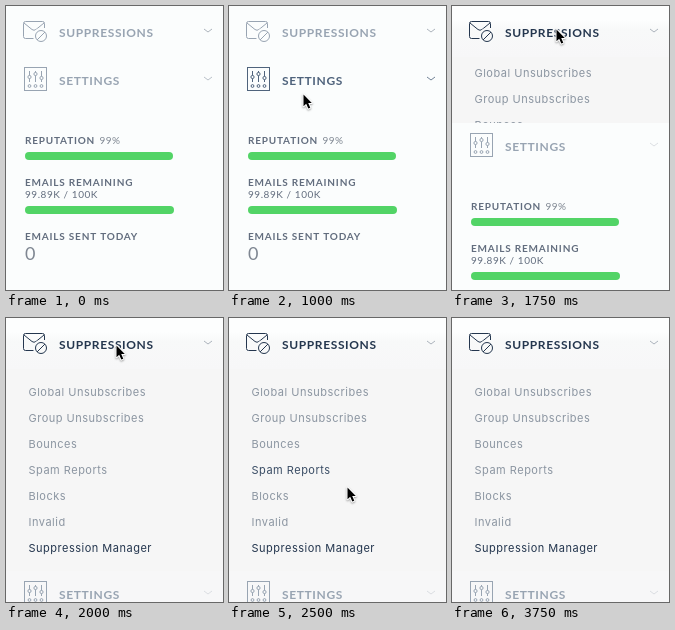
Write an HTML page with a canvas that moves like this. It is 217x284 px and loops after 4250 ms.

```html
<!DOCTYPE html>
<html lang="en">
<head>
<meta charset="utf-8">
<title>Sidebar menu</title>
<style>
html, body { margin: 0; width: 100%; height: 100%; overflow: hidden; background: #fbfdfd; }
canvas { display: block; width: 217px; height: 284px; }
</style>
</head>
<body>
<canvas id="stage"></canvas>
<script>
const W = 217, H = 284, LOOP = 4250;
const canvas = document.getElementById('stage');
const ctx = canvas.getContext('2d');
const scale = window.devicePixelRatio || 1;
canvas.width = W * scale;
canvas.height = H * scale;

const CAPS = 'Lato, "Open Sans", sans-serif';
const BODY = 'Inter, "Open Sans", sans-serif';
const GREY = '#98a4b2', HOVER = '#4f637c', NAVY = '#24364e', LABEL = '#626d7e', SOFT = '#7f8792';
const ITEM = '#8b95a1', ITEM_HOT = '#3a4d65', GREEN = '#52d466';
const ITEMS = ['Global Unsubscribes', 'Group Unsubscribes', 'Bounces', 'Spam Reports',
  'Blocks', 'Invalid', 'Suppression Manager'];

// Each step holds until the next: open = submenu height, hot = hovered item
const STEPS = [
  { at: 0 },
  { at: 750, cursor: [73, 119] },
  { at: 1000, cursor: [73, 87], settings: HOVER },
  { at: 1250, cursor: [98, 38], head: HOVER },
  { at: 1500, cursor: [103, 22], head: HOVER },
  { at: 1750, cursor: [103, 22], head: NAVY, open: 66 },
  { at: 2000, cursor: [109, 26], head: NAVY, open: 202 },
  { at: 2250, cursor: [117, 95], head: NAVY, open: 202, hot: 0 },
  { at: 2500, cursor: [117, 168], head: NAVY, open: 202, hot: 3 },
  { at: 2750, cursor: [105, 228], head: NAVY, open: 202 },
  { at: 3000, cursor: [105, 235], head: NAVY, open: 202 },
  { at: 3750, head: NAVY, open: 202 }
];

function text(str, x, y, font, color, spacing) {
  ctx.font = font;
  ctx.letterSpacing = spacing + 'px';
  ctx.fillStyle = color;
  ctx.fillText(str, x, y);
}

const title = (str, y, color) => text(str, 53, y, `700 12px ${CAPS}`, color, 0.62);
const label = (str, y) => text(str, 19, y, `700 10px ${CAPS}`, LABEL, 0.8);

function line(color, width, ...paths) {
  ctx.strokeStyle = color;
  ctx.lineWidth = width;
  ctx.beginPath();
  for (const p of paths) p.forEach(([x, y], i) => i ? ctx.lineTo(x, y) : ctx.moveTo(x, y));
  ctx.stroke();
}

function ring(x, y, r, fill) {
  ctx.beginPath();
  ctx.arc(x, y, r, 0, Math.PI * 2);
  if (fill) { ctx.fillStyle = fill; ctx.fill(); }
  ctx.stroke();
}

function chevron(y, color) {
  line(color, 0.8, [[198, y - 1.5], [202, y + 1.5], [206, y - 1.5]]);
}

function header(color, paper) {
  ctx.strokeStyle = color;
  ctx.lineWidth = 1;
  ctx.beginPath();
  ctx.roundRect(17.5, 15.5, 21, 17, 2);
  ctx.moveTo(18, 17);
  ctx.lineTo(26, 23.5);
  ctx.quadraticCurveTo(28, 25, 30, 23.5);
  ctx.lineTo(38, 17);
  ctx.stroke();
  line(paper, 2, [[38.5, 22], [38.5, 33]]);
  ctx.lineWidth = 2;
  ring(35, 30, 7, paper);
  ctx.lineWidth = 1;
  ctx.strokeStyle = color;
  ring(35, 30, 5.5);
  line(color, 1, [[31, 34], [39, 26]]);
  title('SUPPRESSIONS', 31, color);
  chevron(24.5, '#98a1ac');
}

function settings(color, paper, arrow) {
  ctx.strokeStyle = color;
  ctx.lineWidth = 1;
  ctx.strokeRect(18.5, 61.5, 22, 23);
  [[23.5, 71], [29.5, 68], [35.5, 72]].forEach(([x, y]) => {
    line(color, 1, [[x, 65], [x, 76]]);
    ring(x, y, 1.6, paper);
    ring(x, 80, 1.4);
  });
  title('SETTINGS', 79, color);
  chevron(72.5, arrow);
}

function bar(y, width) {
  ctx.fillStyle = GREEN;
  ctx.beginPath();
  ctx.roundRect(19, y, width, 8, 4);
  ctx.fill();
}

function stats() {
  label('REPUTATION', 138);
  text('99%', 93.5, 138, `400 10px ${CAPS}`, SOFT, 0.5);
  bar(146, 148);
  label('EMAILS REMAINING', 180);
  text('99.89K / 100K', 19, 192, `400 10px ${CAPS}`, LABEL, 0.55);
  bar(200, 149);
  label('EMAILS SENT TODAY', 234);
  text('0', 19, 254, `400 18px ${CAPS}`, SOFT, 0);
}

function submenu(open, hot) {
  const top = open < 202 ? 71 : 78;
  ctx.save();
  ctx.beginPath();
  ctx.rect(0, 51, W, open);
  ctx.clip();
  ctx.fillStyle = '#f6f6f6';
  ctx.fillRect(0, 51, W, open);
  ITEMS.forEach((name, i) => {
    const color = i === 6 ? NAVY : i === hot ? ITEM_HOT : ITEM;
    text(name, 22.5, top + i * 26, `400 11px ${BODY}`, color, 0.5);
  });
  ctx.restore();
}

function pointer([x, y]) {
  ctx.save();
  ctx.translate(x, y);
  ctx.beginPath();
  [[1.5, 1.5], [1.5, 13.2], [4.2, 10.8], [6.3, 15.6], [8.3, 14.7], [6.2, 10], [9.8, 10]]
    .forEach(p => ctx.lineTo(...p));
  ctx.closePath();
  ctx.lineJoin = 'round';
  ctx.strokeStyle = '#fff';
  ctx.lineWidth = 2;
  ctx.shadowColor = 'rgba(0, 0, 0, 0.35)';
  ctx.shadowBlur = 2 * scale;
  ctx.shadowOffsetY = scale;
  ctx.stroke();
  ctx.shadowColor = 'transparent';
  ctx.fillStyle = '#000';
  ctx.fill();
  ctx.restore();
}

function draw(t) {
  const s = STEPS.findLast(step => step.at <= t);
  const open = s.open || 0;
  const paper = open === 202 ? '#f7f7f8' : '#fbfdfd';
  ctx.setTransform(scale, 0, 0, scale, 0, 0);
  ctx.fillStyle = paper;
  ctx.fillRect(0, 0, W, H);
  if (open) {
    const shade = ctx.createLinearGradient(0, 0, 0, 51);
    shade.addColorStop(0, '#fdfefe');
    shade.addColorStop(0.28, '#fdfefe');
    shade.addColorStop(0.45, '#f8f9f9');
    shade.addColorStop(1, '#f7f7f8');
    ctx.fillStyle = shade;
    ctx.fillRect(0, 0, W, 51);
    submenu(open, s.hot);
  }
  header(s.head || GREY, open ? '#f8f9f9' : paper);
  ctx.save();
  ctx.translate(0, open);
  settings(s.settings || GREY, paper, open ? '#d3d7dc' : s.settings || '#a9b1bb');
  stats();
  ctx.restore();
  if (s.cursor) pointer(s.cursor);
}

const start = performance.now();
function tick() {
  draw((performance.now() - start) % LOOP);
  requestAnimationFrame(tick);
}
tick();
</script>
</body>
</html>
```
